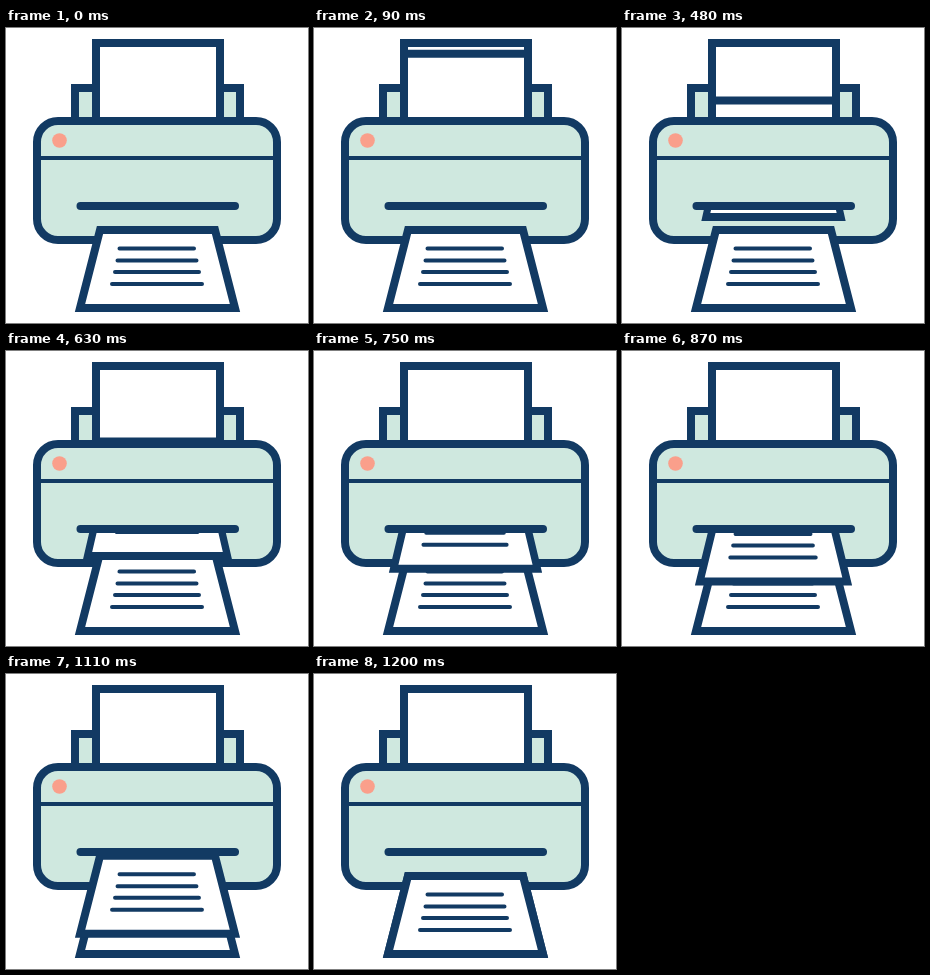
An HTML page that plays this animation: 302 by 295 pixels, repeating every 1650 ms.

```html
<!DOCTYPE html>
<html lang="en">
<head>
<meta charset="utf-8">
<title>Printer</title>
<style>
  html, body { margin: 0; height: 100%; overflow: hidden; background: #fff; }
  svg { display: block; width: 100vw; height: 100vh; }
  .ink { stroke: #123a63; stroke-width: 8; }
  .thin { stroke-width: 4; stroke-linecap: round; }
  .paper { fill: #fff; }
  .shell { fill: #cfe8df; }
</style>
</head>
<body>
<svg viewBox="0 0 302 295">
  <defs>
    <clipPath id="belowSlot"><rect y="178" width="302" height="117"/></clipPath>
    <!-- printed sheet, centred on x = 0 -->
    <g id="sheet">
      <path class="ink paper" d="M-57.5 202H57.5L77.5 280H-77.5Z"/>
      <path class="ink thin" d="M-38 220.5H36.5M-40 232.5H39M-42.5 244H41.5M-45.5 256H44.5"/>
    </g>
  </defs>

  <rect class="ink shell" x="69" y="60" width="165" height="60"/>
  <rect class="ink paper" x="90" y="15" width="124" height="100"/>
  <path id="feedEdge" class="ink" d="M90 0H214"/>

  <rect class="ink shell" x="31" y="93" width="240" height="119" rx="21"/>
  <path class="ink" style="stroke-width:4" d="M31 130H271"/>
  <circle cx="53.5" cy="112.5" r="7.3" fill="#fa9f8b"/>

  <use href="#sheet" x="151.5"/>
  <g clip-path="url(#belowSlot)"><use id="printed" href="#sheet"/></g>
  <path class="ink" stroke-linecap="round" d="M74.5 178H229"/>
</svg>
<script>
  const LOOP = 1650, STEP = 30;
  const feedEdge = document.getElementById('feedEdge');
  const printed = document.getElementById('printed');

  // Slow feed through the slot, then a quick drop onto the tray.
  function sheetOffset(t) {
    return t < 1080 ? -27 - (1080 - t) * 0.1067 : Math.min(0, -27 + (t - 1080) * 0.225);
  }

  function draw(now) {
    const t = Math.floor((now % LOOP) / STEP) * STEP;
    const widen = Math.min(1, 0.873 + (t - 480) * 0.0002);
    feedEdge.setAttribute('transform', `translate(0 ${Math.min(93, 15 + t * 0.12)})`);
    printed.setAttribute('transform', `translate(151.5 ${sheetOffset(t)}) scale(${widen} 1)`);
  }

  const start = performance.now();
  function tick() {
    draw(performance.now() - start);
    requestAnimationFrame(tick);
  }
  tick();
</script>
</body>
</html>
```
